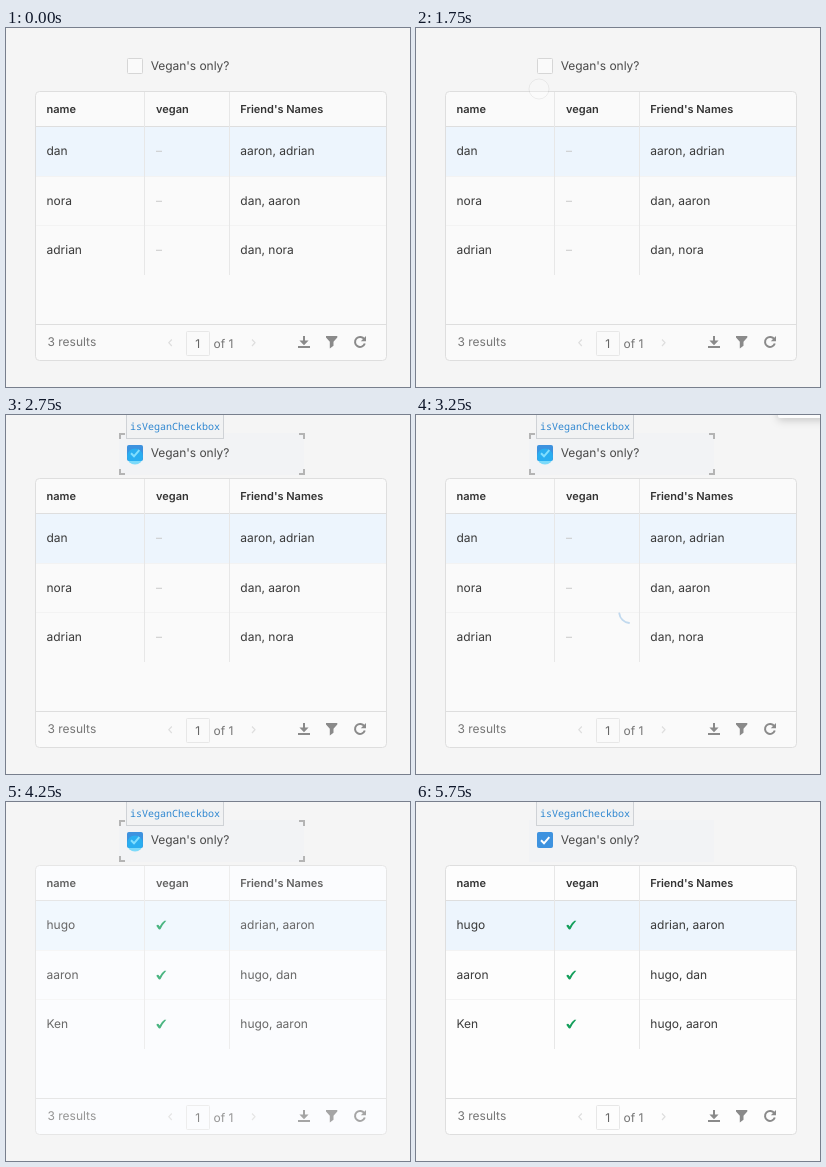
Write an HTML page that moves like this. It is 404 px wide and 359 px high and loops after 6.5 s.

```html
<!DOCTYPE html>
<html lang="en">
<head>
<meta charset="utf-8">
<title>Filtered table</title>
<style>
html, body { margin: 0; width: 100%; height: 100%; overflow: hidden; background: #f5f5f5; }
svg { display: block; }
text { font: 12px Inter, sans-serif; fill: #3b3b3b; white-space: pre; text-rendering: geometricPrecision; }
.head { font-size: 11px; font-weight: 600; fill: #333; }
.soft { fill: #757575; }
.dash { fill: #c9c9c9; }
.label { font: 10px "Noto Sans Mono", "DejaVu Sans Mono", monospace; }
.line { fill: none; stroke: #dedede; }
.faint { fill: none; stroke: #e7e7e7; }
.icon { fill: none; stroke: #8a8a8a; stroke-width: 2; }
#popup { filter: drop-shadow(0 2px 4px rgba(0, 0, 0, .2)); }
</style>
</head>
<body>
<svg width="404" height="359" viewBox="0 0 404 359">
  <rect width="404" height="359" fill="#f5f5f5"/>

  <g id="table">
    <rect id="sheet" x="29.5" y="63.5" width="351" height="269" rx="4" stroke="#dedede"/>
    <rect x="30" y="99" width="350" height="49" fill="#edf5fd"/>
    <path class="line" style="stroke:#f3f3f3" d="M30 148.5H380M30 197.5H380"/>
    <path class="line" d="M30 98.5H380M30 296.5H380"/>
    <path class="faint" d="M138.5 64V247M223.5 64V247"/>
    <text class="head" x="40.5" y="85">name</text>
    <text class="head" x="150" y="85">vegan</text>
    <text class="head" x="234.3" y="85">Friend's Names</text>
    <g id="rows"></g>
    <text class="soft" x="41.5" y="318">3 results</text>
    <path class="line" style="stroke-width:1.2" d="M165.8 311.5L162.8 314.7L165.8 318M246 311.5L249 314.7L246 318"/>
    <rect class="faint" x="180.5" y="303.5" width="23" height="24" rx="1"/>
    <text x="189.2" y="319.5" style="fill:#666">1</text>
    <text class="soft" x="207.5" y="319.5">of 1</text>
    <path class="icon" d="M298 308V315M292 319H304"/>
    <path fill="#8a8a8a" d="M293.4 312.5H302.6L298 317.2ZM320 308H331.3V309.4L327.5 313.8V317.8L323.8 320.4V313.8L320 309.4Z"/>
    <path class="icon" d="M358.3 311.3A5 5 0 1 0 358.8 315.5"/>
    <path fill="#8a8a8a" d="M360 308V313.2H354.8Z"/>
  </g>
  <rect id="veil" x="29" y="63" width="352" height="270" rx="4" fill="#fcfdfe"/>
  <path id="spinner" fill="none" stroke="#2d86d0" stroke-width="1.8" stroke-linecap="round" d="M203.3 198.4A10.7 10.7 0 0 0 213.1 208"/>

  <rect id="panelFoot" x="113" y="60" width="117" height="13" fill="#eee9e0" opacity=".3"/>
  <rect id="panel" x="113" y="18" width="185" height="42"/>
  <circle id="ring" r="10" fill="#fff" fill-opacity=".25" stroke="#000" stroke-opacity=".06"/>
  <path id="corners" fill="none" stroke="#b4b4b4" stroke-width="2" d="M114 24V19H119M293 19H298V24M298 54V59H293M119 59H114V54"/>
  <g id="tag">
    <rect x="120.5" y="-.5" width="97" height="24" fill="#f1f2f3" stroke="#cfd2d6"/>
    <text id="tagText" class="label" x="124" y="15">isVeganCheckbox</text>
  </g>
  <rect id="box" x="121.5" y="30.5" width="15" height="15" rx="1"/>
  <path id="tick" fill="none" stroke="#fff" stroke-width="2" d="M125 38.3L128 41.3L133.3 35.2"/>
  <text x="144.7" y="42" style="fill:#4a4a4a;letter-spacing:-.05px">Vegan's only?</text>
  <circle id="cursor" r="8" fill="#1bc4fe" opacity=".55"/>

  <rect id="popup" x="362" y="-8" width="50" height="11" rx="2" fill="#fcfcfc"/>
</svg>
<script>
const LOOP = 6500, STEP = 250;
const $ = id => document.getElementById(id);
const show = (id, on) => $(id).setAttribute('visibility', on ? 'visible' : 'hidden');
const set = (id, attrs) => { for (const k in attrs) $(id).setAttribute(k, attrs[k]); };

const everyone = ['dan', 'nora', 'adrian'];
const vegans = ['hugo', 'aaron', 'Ken'];
const allFriends = ['aaron, adrian', 'dan, aaron', 'dan, nora'];
const veganFriends = ['adrian, aaron', 'hugo, dan', 'hugo, aaron'];
const baselines = [127, 177, 226];
const leaf = 'M150.3 123.8Q151.6 122.2 152.6 123L153.6 124.4Q155.8 120.6 158.4 118.8L160.3 118.7Q156.8 122.4 154.6 126.9Q153.4 127.9 152.5 127Z';

$('rows').innerHTML = baselines.map((y, i) => `
  <text id="name${i}" x="40.5" y="${y}"/>
  <text id="dash${i}" class="dash" x="150" y="${y}">–</text>
  <path id="leaf${i}" fill="#159f5c" d="${leaf}" transform="translate(0 ${y - 127})"/>
  <text id="friend${i}" x="234.3" y="${y}"/>`).join('');

// [start, x, y]: the pointer holds each place until the next
const stops = [[500, 150, 54], [750, 129, 36], [1000, 125, 36], [1250, 127, 40], [1500, 127, 41], [2500, 129, 41.5]];
// [start, veil opacity, sheet colour]
const veils = [
  [0, 0, '#fafafa'], [3500, .45, '#fdfdfd'], [4000, .4, '#fafbfd'],
  [4250, .23, '#fafbfd'], [4500, .09, '#fdfdfd'], [4750, 0, '#fdfdfd']
];
const at = (list, t) => list.filter(s => s[0] <= t).pop();

function draw(ms) {
  const t = Math.floor((ms % LOOP) / STEP) * STEP;
  const within = (a, b) => t >= a && t < b;
  const picked = t >= 2250, checked = t >= 2750;

  const stop = at(stops, t);
  show('cursor', within(500, 1750) || within(2500, 5750));
  if (stop) set('cursor', { cx: stop[1], cy: stop[2] });
  show('ring', within(1750, 2500));
  set('ring', { cx: picked ? 126.5 : 123, cy: 61 });

  show('tag', picked);
  show('panel', picked);
  show('panelFoot', within(2250, 2750));
  show('corners', within(2250, 5750));
  set('panel', { fill: t < 2750 ? '#f3f2f0' : '#f2f3f5' });
  $('tagText').style.fill = t < 2500 ? '#d0393e' : '#2d86d0';
  set('box', { fill: checked ? '#3d92df' : '#fafafa', stroke: picked ? '#3d92df' : '#d6d6d6' });
  show('tick', checked);
  show('popup', within(3000, 4000));

  const filtered = t >= 3750, joined = t >= 4000;
  baselines.forEach((_, i) => {
    $('name' + i).textContent = (filtered ? vegans : everyone)[i];
    $('friend' + i).textContent = (joined ? veganFriends : allFriends)[i];
    show('dash' + i, !filtered);
    show('leaf' + i, filtered);
  });
  const [, opacity, fill] = at(veils, t);
  set('veil', { opacity });
  set('sheet', { fill });

  show('spinner', within(3250, 4000));
  set('spinner', {
    opacity: Math.min(1, .28 + (t - 3250) / 500 * .72),
    transform: `rotate(${(t - 3250) / 500 * 360} 214 197.4)`
  });
}

const start = performance.now();
function tick() {
  draw(performance.now() - start);
  requestAnimationFrame(tick);
}
tick();
</script>
</body>
</html>
```
